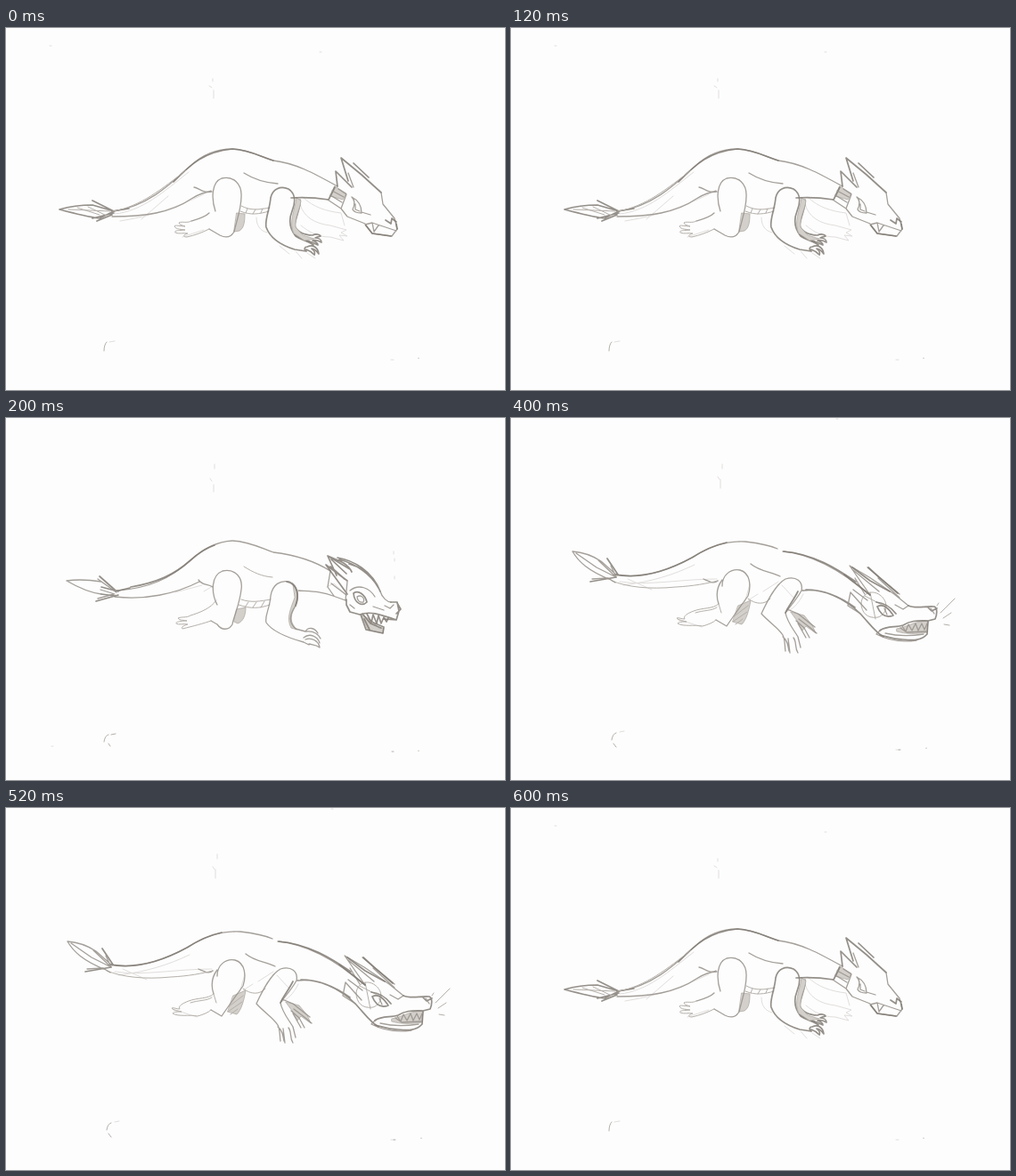
Write an HTML page that moves like this. It is 560 px wide and 407 px high and loops after 0.8 s.

```html
<!DOCTYPE html>
<html lang="en">
<head>
<meta charset="utf-8">
<title>Dragon pencil test</title>
<style>
html, body { margin: 0; width: 100%; height: 100%; overflow: hidden; background: #fdfdfd; }
svg { display: block; width: 100vw; height: 100vh; }
path { fill: none; stroke-linecap: round; stroke-linejoin: round; }
.dark { stroke: #827c75; stroke-width: 1.7; stroke-opacity: .85; }
.mid { stroke: #9b958e; stroke-width: 1.3; stroke-opacity: .9; }
.thin { stroke: #b5b0aa; stroke-width: 1; }
.faint { stroke: #dedbd8; stroke-width: .9; }
.shade { fill: #d3cfca; stroke: #b0aba5; stroke-width: .8; }
</style>
</head>
<body>
<svg viewBox="0 0 560 407">
<!-- crouching, mouth closed -->
<g class="pose">
  <path class="faint" d="M122 209C153 206 177 184 205 162M128 217C165 211 190 202 222 187M152 215L182 189M198 235L222 227M281 213C281 222 285 228 293 230M330 198C334 213 347 220 364 222L382 227L376 230L383 234L374 233L379 239L364 235C350 235 341 230 331 222M333 190C345 202 360 206 376 208L380 222M307 245L318 254M325 251L332 259M338 253L347 259"/>
  <path class="shade" d="M259 208L268 209C268 218 267 225 262 228L256 229Z"/>
  <path class="shade" d="M369 178L382 186L378 193L364 189Z"/>
  <path class="mid" d="M121 206C160 200 185 175 207 155C220 143 235 136 254 136C275 137 288 146 300 149C325 152 345 163 372 178M119 212C155 212 185 208 208 192C216 187 224 184 231 184M211 179C217 180 222 187 230 183M267 163C278 170 290 174 305 175"/>
  <path class="dark" d="M188 173C207 153 223 139 254 136C275 137 288 146 300 149M60 204C74 200 86 199 97 199L121 206L105 214C90 212 75 208 60 204M97 194L121 206M97 214L121 208M102 217L119 210M119 206L138 203"/>
  <path class="thin" d="M70 204L117 206M80 202L105 210M92 201L113 211M120 206C151 201 176 180 202 160"/>
  <path class="mid" d="M235 206C230 191 231 173 242 169C255 166 265 175 264 190C264 203 259 216 256 229C252 236 246 236 240 233L228 226M228 208C223 213 215 215 208 217"/>
  <path class="thin" d="M208 217C203 220 197 217 194 219C195 222 199 222 201 223C196 223 189 221 189 223C191 227 197 226 201 227C196 228 188 227 190 230C194 232 199 230 204 231C199 232 198 235 203 235C212 233 220 230 228 226"/>
  <path class="thin" d="M264 200C275 206 285 204 296 202M263 206C275 211 285 209 295 206M271 203L269 208M280 204L277 209M288 203L286 208"/>
  <path class="dark" d="M297 191C299 181 308 177 317 181C325 186 325 196 321 206C317 216 318 225 325 234M297 191C296 204 290 216 292 224C297 238 311 245 324 249L337 251M325 234C332 239 339 239 345 244M337 251C334 249 335 246 338 246C345 243 350 247 351 254C348 250 346 248 343 248C346 250 347 253 346 255C343 252 340 250 337 249"/>
  <path class="dark" d="M330 193C331 202 325 212 324 222C325 228 334 233 344 233C348 231 352 232 353 234C350 235 348 235 347 236C351 236 354 238 354 241C351 239 348 238 344 239C347 240 350 242 350 244C343 240 334 239 324 232"/>
  <path class="shade" d="M326 191L331 194C330 204 324 212 325 224L333 233L346 237L335 239L323 231C317 219 324 205 326 191Z"/>
  <path class="dark" d="M320 191C335 190 349 191 362 193L369 179M384 172L376 146L399 165L421 185M390 152L407 168M372 178L370 161L388 179"/>
  <path class="mid" d="M384 163L390 179M373 181L382 187L376 203L361 193M366 183L379 190M364 188L377 196M376 203L383 212L403 220M421 185L423 198L436 214L439 226L433 234L411 231L403 221L411 219L438 228M411 219L413 229L418 222M388 190C394 193 399 199 399 208C394 208 390 206 389 204C392 198 391 193 388 190M392 198L392 204L397 206M399 207L409 210"/>
  <path class="dark" d="M426 216L432 220L433 214L438 218M438 220L439 226M404 222L411 231L432 234"/>
  <path class="faint" d="M49 20h2M228 65l3 2M232 57v3M233 70v9M352 27h2M432 373h3M116 353l6-1"/>
  <path class="thin" d="M110 363Q110 356 113 353M463 371v.5"/>
</g>
<!-- mouth opening -->
<g class="pose">
  <path class="faint" d="M190 196L220 188M360 190L368 186L382 199M435 150v3M436 158v3M436 178v3M232 189L222 195"/>
  <path class="shade" d="M259 215L269 213C269 222 266 229 260 231L256 229Z"/>
  <path class="shade" d="M322 186C329 194 329 205 324 213C318 224 319 231 327 238L320 236C314 225 320 213 324 202Z"/>
  <path class="shade" d="M399 221L411 228L418 236L424 236L423 242L406 238Z"/>
  <path class="mid" d="M124 194C160 192 185 180 207 160C220 148 235 139 254 138C275 139 290 148 300 151C325 154 345 160 364 172M122 201C155 205 190 198 217 184M216 182C221 189 226 186 232 190"/>
  <path class="thin" d="M267 167C278 174 287 178 299 179"/>
  <path class="dark" d="M140 190C170 185 189 176 207 160C216 152 225 146 234 143M105 178L123 194M107 190L126 195M101 206L126 199M107 198L122 200M123 195L139 191"/>
  <path class="mid" d="M68 183C82 181 94 182 107 184L124 196M68 183C80 190 92 196 107 198M103 181L124 196M106 193L122 198M103 203L121 198"/>
  <path class="mid" d="M237 210C230 196 230 177 243 172C258 169 266 180 264 193C262 210 256 222 254 232C250 239 242 239 237 232L230 228"/>
  <path class="thin" d="M236 205C230 214 217 219 207 222C202 225 198 223 193 225C195 228 200 227 203 228C198 228 190 229 191 231C194 233 199 231 204 232C200 233 196 235 198 237C210 234 222 231 230 228"/>
  <path class="thin" d="M264 204C275 208 285 206 297 204M261 210C275 215 285 214 296 210M272 207L268 213M281 207L277 213M290 206L286 213"/>
  <path class="mid" d="M297 200C299 187 308 182 318 184C328 188 329 200 325 211C318 221 317 230 325 237L336 240M297 200C296 215 290 222 292 230C299 240 316 247 334 252L340 255M336 240C339 235 346 235 350 242M336 240C344 239 350 242 353 248M334 247C341 241 350 246 352 253M336 249C343 246 351 251 352 258C348 255 344 255 340 254"/>
  <path class="dark" d="M315 184C328 187 329 200 325 211"/>
  <path class="mid" d="M328 194C343 195 355 195 367 200L381 205M364 172L361 190L368 200M365 186L382 199"/>
  <path class="dark" d="M383 198L359 165L383 183M371 177L361 155L386 170M361 155C373 160 383 163 388 173M372 157C390 160 411 172 420 195M374 159C393 164 410 176 418 191M364 167L380 181M365 159L382 175M385 164C395 167 405 172 411 180"/>
  <path class="mid" d="M383 184L381 205M420 195C422 202 428 207 432 207M386 194C396 186 408 191 414 201M425 211L431 214L435 210M394 201C399 198 403 203 401 207C397 208 394 205 394 201M386 210L391 214M412 212L424 216"/>
  <path class="dark" d="M382 204L382 210L386 218L397 221C408 217 418 220 438 227L441 217L439 207L432 207M398 221L404 238L423 242L424 235L412 230M390 197C396 193 403 199 405 207C400 212 391 209 390 197M400 220L409 231L421 236M438 227L424 226M439 208L443 215L438 220"/>
  <path class="dark" d="M405 220L410 230L412 221L416 231L418 222L421 231L424 224L427 229L429 225M402 226L408 238"/>
  <path class="faint" d="M234 52v5M229 68l2 3M233 75v8M51 369h2"/>
  <path class="thin" d="M110 364Q111 357 115 356M118 356l5-1M115 366l2 3M433 375h2M463 374v.5"/>
</g>
<!-- lunging, snarl -->
<g class="pose">
  <path class="faint" d="M122 184C154 189 190 181 231 181M126 188C157 184 181 177 206 165M187 226L214 235M283 195L300 184M304 188L318 203M328 198C322 210 316 215 309 218M277 198L266 205M131 181L158 193M268 187L262 208"/>
  <path class="thin" d="M393 208C394 196 406 193 414 199C424 206 423 220 412 224C400 226 393 219 393 208M397 200L420 212M403 196L409 226"/>
  <path class="shade" d="M255 211L269 205C267 217 264 227 259 232L249 229Z"/>
  <path class="shade" d="M314 218L329 222L338 233L342 242L331 234L327 239L321 228Z"/>
  <path class="shade" d="M433 237C445 235 450 229 468 228L467 241C455 243 443 243 433 240Z"/>
  <path class="mid" d="M116 176C150 183 185 167 205 156C225 143 245 138 263 139C280 141 290 143 299 147M305 150C340 153 375 175 403 199M216 181C223 184 228 187 232 183M269 164C280 173 290 172 302 178"/>
  <path class="thin" d="M113 183C130 190 155 193 185 190C205 189 220 186 232 183"/>
  <path class="dark" d="M118 176C150 182 181 169 203 157C217 148 228 143 242 140M306 150C340 153 365 169 387 184M108 158L120 176M89 184L118 179"/>
  <path class="mid" d="M69 150C82 151 92 155 101 161L119 177M69 150C76 162 87 172 112 182M73 152L96 168L118 179M98 160L117 178M91 181L109 180L117 185M112 166L118 179"/>
  <path class="mid" d="M237 189C237 176 247 169 257 171C268 174 270 188 266 200C259 210 250 222 242 234L230 227M237 182C231 190 230 200 233 209"/>
  <path class="thin" d="M233 209C227 215 215 213 205 217C197 220 193 223 195 226C191 226 188 224 186 225C188 228 193 228 197 229C193 229 188 229 187 231C194 235 205 232 215 234C222 232 227 230 230 227M233 209L236 219M207 219C216 216 225 217 231 213"/>
  <path class="thin" d="M266 203C275 210 285 210 291 203M249 224L266 211M249 229L265 218M252 232L260 226"/>
  <path class="mid" d="M281 220C288 205 297 187 308 181C320 177 328 184 326 194C320 205 312 213 308 219C310 230 318 239 322 246L325 258M281 220C290 230 300 236 305 244C308 250 307 257 308 262M311 248L313 264M317 247C321 252 318 258 322 264M305 246C310 249 311 256 312 262M310 215L322 220L337 232M320 228L329 236L335 247M323 226L336 236L343 242M327 224L341 235M322 231L331 247"/>
  <path class="dark" d="M327 194C350 191 375 203 392 220C403 232 410 242 418 246M322 195C317 205 311 212 308 219M331 193C351 193 371 202 386 213"/>
  <path class="mid" d="M381 196L378 211L392 220M381 196L399 216M384 193L400 205M403 199L380 166L402 179L430 198L446 211M386 180L397 198M400 168L436 198M412 180L436 202M384 171L413 195"/>
  <path class="dark" d="M383 168L403 183L425 195M401 168L413 179L434 197M374 176L403 199M446 211C455 215 465 211 475 212C479 214 478 221 476 226L468 228M468 213L472 217L478 214M414 239C422 233 432 236 440 233C449 227 458 228 468 228L467 243C460 251 450 250 440 249C430 249 422 246 414 244M411 212C419 208 425 216 429 222C421 225 415 222 411 212M410 207C418 208 426 212 432 220"/>
  <path class="mid" d="M446 211L440 215L431 210M415 238L410 243C423 250 440 252 455 250M437 236L444 241L466 240M439 234L443 240L446 232L450 239L454 231L457 239L461 231L464 238L468 229M420 242C433 245 450 245 463 243M419 214L422 221M471 214L475 220"/>
  <path class="thin" d="M482 219L498 203M485 225L494 219M486 232L492 233M478 211l2-3"/>
  <path class="faint" d="M237 52v5M232 66l2 3M235 69v10M365 1h2M122 353l5-1M432 373h4"/>
  <path class="thin" d="M113 362Q114 355 118 354M115 366l3 4M435 373h2M466 371v.5"/>
</g>
</svg>
<script>
const poses = document.querySelectorAll('.pose');
const order = [0, 1, 2, 0], hold = 200;
const start = performance.now();

function draw(time) {
  const current = order[Math.floor(time / hold) % order.length];
  poses.forEach((pose, i) => { pose.style.display = i === current ? '' : 'none'; });
}
function tick() {
  draw(performance.now() - start);
  requestAnimationFrame(tick);
}
tick();
</script>
</body>
</html>
```
